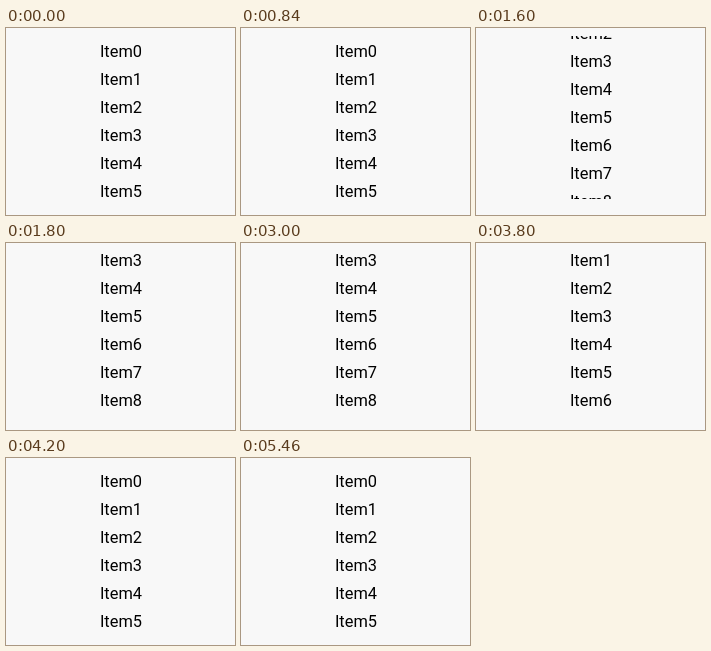
Animation, 229 px wide and 187 px high, one loop 6300 ms. Source, as an HTML page:

```html
<!DOCTYPE html>
<html lang="en">
<head>
<meta charset="utf-8">
<title>Scrolling list</title>
<style>
  html, body { margin: 0; width: 100%; height: 100%; overflow: hidden; background: #f8f8f8; }
  svg { display: block; }
  text { font: 16.4px Roboto, sans-serif; fill: #000; }
</style>
</head>
<body>
<svg width="229" height="187">
  <clipPath id="view"><rect y="8" width="229" height="163"/></clipPath>
  <g clip-path="url(#view)"><g id="list"></g></g>
</svg>
<script>
const LOOP = 6300, ROW = 28, COUNT = 9;
// [start in ms, scroll offset in px]; the list jumps between positions
const steps = [[0, 0], [1400, 56], [1600, 74], [1800, 90], [3800, 34], [4000, 33], [4200, 0]];

const list = document.getElementById('list');
for (let i = 0; i < COUNT; i++) {
  const item = document.createElementNS('http://www.w3.org/2000/svg', 'text');
  item.setAttribute('x', 93.9);
  item.setAttribute('y', 29 + i * ROW);
  item.textContent = 'Item' + i;
  list.append(item);
}

function draw() {
  const time = performance.now() % LOOP;
  const [, scroll] = steps.findLast(([start]) => start <= time);
  list.setAttribute('transform', `translate(0 ${-scroll})`);
  requestAnimationFrame(draw);
}
draw();
</script>
</body>
</html>
```
